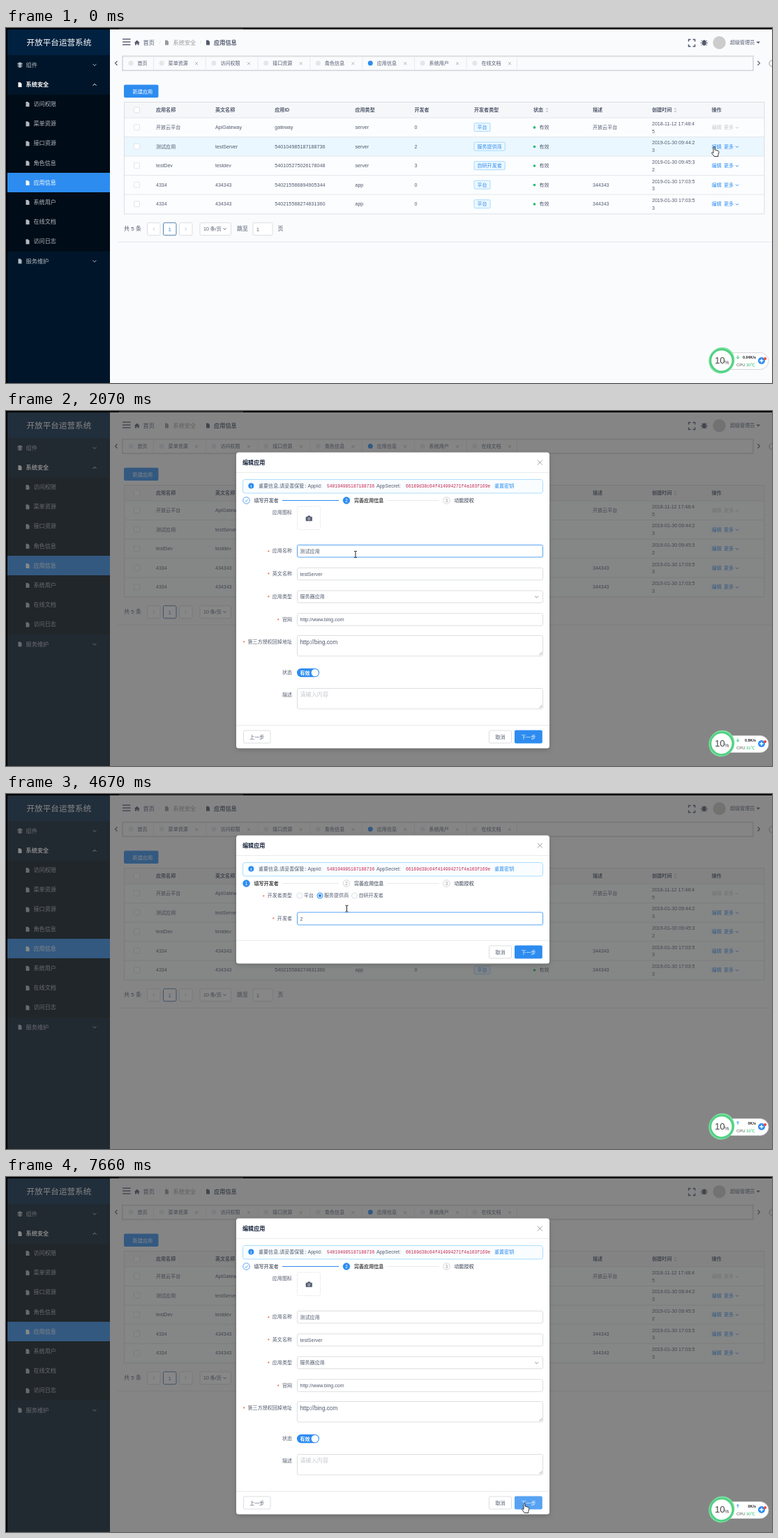
An HTML page for the animation above (8 s loop, 1098x510 px).

```html
<!DOCTYPE html>
<html lang="zh">
<head>
<meta charset="utf-8">
<style>
html, body { margin: 0; height: 100%; overflow: hidden; background: #000; }
svg { display: block; width: 100vw; height: 100vh; }
text { font-family: "Liberation Sans", "Noto Sans CJK SC", "Noto Sans CJK", sans-serif; white-space: pre; }
.mono { font-family: "Liberation Mono", monospace; }
</style>
</head>
<body>
<svg id="stage" viewBox="0 0 1098 510"></svg>
<script>
const BLUE = '#2d8cf0', INK = '#515a6e', GREY = '#c5c8ce', LINE = '#dcdee2';

// Drawing helpers; text is placed by its vertical middle.
const text = (x, y, s, size = 7.05, fill = INK, extra = '') =>
  `<text x="${x}" y="${y + size * .37}" font-size="${size}" fill="${fill}" ${extra}>${s}</text>`;
const rect = (x, y, w, h, fill, stroke = 'none', r = 0, extra = '') =>
  `<rect x="${x}" y="${y}" width="${w}" height="${h}" fill="${fill}" stroke="${stroke}" rx="${r}" ${extra}/>`;
const circle = (x, y, r, fill, stroke = 'none', extra = '') =>
  `<circle cx="${x}" cy="${y}" r="${r}" fill="${fill}" stroke="${stroke}" ${extra}/>`;
const path = (d, stroke, width = 1, fill = 'none', extra = '') =>
  `<path d="${d}" fill="${fill}" stroke="${stroke}" stroke-width="${width}" ${extra}/>`;
const hline = (x, y, w, color, width = 1) => path(`M${x} ${y}h${w}`, color, width);
const chevron = (x, y, color, s = 2, flip = 1) =>
  path(`M${x - s} ${y - s * flip / 2}l${s} ${s * flip}l${s} ${-s * flip}`, color, 1);
const cross = (x, y, s, color) => path(`M${x - s} ${y - s}l${2 * s} ${2 * s}m0 ${-2 * s}l${-2 * s} ${2 * s}`, color, .8);
const doc = (x, y, color) => path(`M${x - 2.5} ${y - 3.5}h3l2 2v5h-5z`, 'none', 0, color);
const bold = 'font-weight="bold"', mid = 'text-anchor="middle"', end = 'text-anchor="end"';

function sidebar() {
  const soft = '#b3b9c0', items = ['访问权限', '菜单资源', '接口资源', '角色信息', '应用信息', '系统用户', '在线文档', '访问日志'];
  let s = rect(2, 2, 147, 508, '#001529') + rect(2, 2, 147, 37, '#002140') + rect(2, 96, 147, 225, '#000c17')
    + text(29.5, 20.5, '开放平台运营系统', 11.6, '#fff')
    + path('M20 49.5l3.5 1.7-3.5 1.7-3.5-1.7zM16.5 53l3.5 1.7 3.5-1.7M16.5 55l3.5 1.7 3.5-1.7', soft, .8, soft)
    + text(28.5, 53, '组件', 8.2, soft) + chevron(127, 53, soft, 2.5)
    + doc(20, 81.5, '#fff') + text(28.5, 81, '系统安全', 8.2, '#fff', bold) + chevron(127, 81.5, '#fff', 2.5, -1)
    + doc(20, 335, soft) + text(28.5, 334.5, '服务维护', 8.2, soft) + chevron(127, 335, soft, 2.5);
  items.forEach((name, i) => {
    const y = 109.3 + i * 28.2, on = i === 4;
    if (on) s += rect(2, Math.round(y - 14), 147, 28, BLUE);
    s += doc(31, y + .3, on ? '#fff' : soft) + text(39.5, y - .3, name, 8.1, on ? '#fff' : soft);
  });
  return s;
}

function header() {
  const tabs = ['首页', '菜单资源', '访问权限', '接口资源', '角色信息', '应用信息', '系统用户', '在线文档'];
  let s = [16, 20, 24].map(y => hline(167, y, 11.5, INK, 1.4)).join('')
    + path('M183.8 21.3l4-3.8 4 3.8h-1.2v3.2h-2v-2h-1.6v2h-2v-3.2z', 'none', 0, INK)
    + text(196.5, 20.5, '首页', 8.2) + text(219.5, 20.5, '/', 8, LINE)
    + doc(230.5, 21, '#999') + text(239.5, 20.5, '系统安全', 8.2, '#999') + text(278, 20.5, '/', 8, LINE)
    + doc(289.5, 21, INK) + text(298, 20.5, '应用信息', 8.2, INK, bold)
    + path('M978.5 19.5v-3h3m3 0h3v3m0 4v3h-3m-3 0h-3v-3', INK, 1.5)
    + path('M996.5 18l8.5 7m-8.5 0l8.5-7m-9.5 3.5h10.5', INK, 1) + `<ellipse cx="1000.8" cy="21.3" rx="2.7" ry="4" fill="${INK}"/>`
    + circle(1022.5, 21, 9.2, '#ccc') + text(1038, 20.5, '超级管理员') + path('M1075.5 19.5h5.5l-2.75 3z', 'none', 0, INK)
    + rect(167, 40.5, 904, 20.5, '#fafbfd', '#dcdde0', 0, 'stroke-width="2"')
    + path('M159.5 47.5l-3 3 3 3M1077.5 47.5l3 3-3 3', INK, 1.2) + circle(1098.5, 51, 4.5, 'none', '#999');
  tabs.forEach((name, i) => {
    const dot = i ? 148.3 + i * 74.8 : 179, on = i === 5;
    s += circle(dot, 50.5, 3.5, on ? BLUE : '#e4e6e9') + text(dot + 9.5, 50.5, name)
      + path(`M${i < 7 ? 211.5 + i * 74.8 : 732.5} 42v17.5`, '#e8eaec');
    if (i) s += cross(dot + 50, 51, 2, '#aaa');
  });
  return s;
}

function table() {
  const heads = ['应用名称', '英文名称', '应用ID', '应用类型', '开发者', '开发者类型', '状态', '描述', '创建时间', '操作'];
  const cols = [215, 300, 385.3, 500.5, 585.5, 671, 756, 841, 926, 1011.5];
  const rows = [
    ['开放云平台', 'ApiGateway', 'gateway', 'server', '0', '平台', '开放云平台', '2018-11-12 17:48:45'],
    ['测试应用', 'testServer', '540104985187188736', 'server', '2', '服务提供商', '', '2019-01-30 09:44:23'],
    ['testDev', 'testdev', '540105275026178048', 'server', '3', '自研开发者', '', '2019-01-30 09:45:32'],
    ['4334', '434343', '540215586894905344', 'app', '0', '平台', '344343', '2019-01-30 17:03:53'],
    ['4334', '434343', '540215588274831360', 'app', '0', '平台', '344343', '2019-01-30 17:03:53']];
  const box = y => rect(183.5, y - 4, 8, 8, '#fff', LINE, 1, 'stroke-width=".8"');
  const sorter = x => path(`M${x - 2} 117l2-2.5 2 2.5zm0 2l2 2.5 2-2.5z`, 'none', 0, GREY);
  let s = rect(169, 81.5, 49.5, 18.5, BLUE, 'none', 2) + text(181.5, 91, '新建应用', 7.2, '#fff')
    + rect(169.5, 106.5, 917.5, 160.5, '#fcfdfe') + rect(169.5, 106.5, 917.5, 22.5, '#f6f7f9')
    + `<g id="hover">${rect(169.5, 156.5, 917.5, 27.5, '#ebf7ff')}</g>` + box(117.8) + sorter(775.5) + sorter(959.5);
  heads.forEach((h, i) => s += text(cols[i], 117.5, h, 7.05, INK, bold));
  rows.forEach((r, i) => {
    const y = 142.6 + i * 27.55, tagWidth = r[5].length * 7.05 + 9, link = i ? BLUE : GREY;
    s += hline(169.5, y - 13.6, 917.5, '#e4e6ea') + box(y);
    r.slice(0, 5).forEach((v, k) => s += text(cols[k], y, v, v.length > 15 ? 7.22 : 7.05));
    s += rect(671, y - 6, tagWidth, 12, '#edf7ff', '#91d5ff', 1.5, 'stroke-width=".8"') + text(675.5, y, r[5], 7.05, BLUE)
      + circle(757.5, y + .3, 1.8, '#19be6b') + text(764.5, y, '有效') + text(841, y, r[6])
      + text(926, y - 5.3, r[7].slice(0, -1)) + text(926, y + 5.3, r[7].slice(-1))
      + text(1011.5, y, '编辑', 7.05, link) + text(1029, y, '更多', 7.05, link) + chevron(1048, y + .5, link);
  });
  s += rect(169.5, 106.5, 917.5, 160.5, 'none', LINE);
  const cell = (x, w, color = LINE) => rect(x, 279.8, w, 18, '#fff', color, 2);
  return s + text(169, 288.5, '共 5 条', 8) + cell(202.5, 18.5) + cell(225.5, 18.5, '#4d7fae') + cell(248.5, 18.5)
    + path('M213 286.5l-2 2.3 2 2.3M256.5 286.5l2 2.3-2 2.3', GREY) + text(234.7, 288.8, '1', 8, BLUE, mid)
    + cell(278, 44.5) + text(283, 288.5, '10 条/页') + chevron(313.5, 288.7, INK)
    + text(331, 288.5, '跳至', 8) + cell(354, 28) + text(359, 289, '1') + text(389.5, 288.5, '页', 8)
    + hline(160, 307.5, 937, '#e4e6ea');
}

const field = (id, y, h, value, size, color) =>
  rect(417.5, y, 352, h, '#fff', LINE, 2, id && `id="${id}"`) + text(421.5, h > 20 ? y + 9 : y + h / 2, value, size, color);
const grip = y => path(`M764.5 ${y}l4-4m-1.8 4l1.8-1.8`, '#888', .7);
const label = (y, s, required = true) => text(410, y, s, 7.05, INK, end)
  + (required ? text(406 - s.length * 7.05, y + 1, '*', 8, '#ed4014', end) : '');

function stepBar(active) {
  const names = ['填写开发者', '完善应用信息', '功能授权'], xs = [344.5, 488, 631.5];
  return names.map((name, i) => {
    const x = xs[i], n = i + 1, on = n === active, done = n < active;
    return circle(x, 128.5, 4.8, on ? BLUE : '#fff', on || done ? BLUE : GREY, 'stroke-width=".8"')
      + (done ? path(`M${x - 2} 128.7l1.5 1.5 2.7-3`, BLUE, .8) : text(x, 128.5, n, 6.5, on ? '#fff' : '#999', mid))
      + text(x + 11, 128.5, name, 7.05, on ? '#444' : '#6b7280', bold)
      + (i < 2 ? hline(i ? 546 : 396, 128.5, i ? 75 : 81, done ? BLUE : '#e8eaec') : '');
  }).join('');
}

function dialog(step, bottom, form) {
  const button = (x, w, s) => rect(x, bottom - 25.5, w, 18, '#fff', LINE, 2) + text(x + w / 2, bottom - 16.5, s, 7.05, INK, mid);
  return `<g id="step${step}">` + rect(330, 59.5, 449, bottom - 59.5, '#fff', 'none', 3.5, 'filter="url(#shadow)"')
    + text(339, 73.7, '编辑应用', 8.1, '#17233d', bold) + cross(765.3, 74, 3.5, '#888') + hline(330, 88.5, 449, '#e8eaec')
    + rect(339.5, 98.5, 430, 19.5, '#f9fdff', '#abdcff', 3) + circle(351.3, 107.5, 4, BLUE)
    + text(351.3, 107.5, 'i', 6, '#fff', `${mid} ${bold}`)
    + text(362, 107.7, '重要信息,请妥善保管：') + text(432.5, 107.7, 'AppId:')
    + text(460, 108, '540104985187188736', 6.32, '#c7254e', 'class="mono"') + text(531, 107.7, 'AppSecret:')
    + text(573, 108, '66189d38c04f414994271f4a103f169e', 6.32, '#c7254e', 'class="mono"')
    + text(700, 107.7, '重置密钥', 7.05, BLUE) + stepBar(step) + form + hline(330, bottom - 33, 449, '#e8eaec')
    + (step > 1 ? button(340.5, 38.5, '上一步') : '') + button(692.5, 32, '取消')
    + rect(729, bottom - 26, 39.8, 19, BLUE, 'none', 2, `id="next${step}"`)
    + text(749, bottom - 16.5, '下一步', 7.05, '#fff', mid) + '</g>';
}

const developerForm = label(145.7, '开发者类型')
  + [[421, '平台'], [450, '服务提供商'], [499.5, '自研开发者']].map(([x, s], i) =>
    circle(x, 146, 4, '#fff', i === 1 ? BLUE : LINE) + (i === 1 ? circle(x, 146, 2.3, BLUE) : '') + text(x + 6, 145.7, s)).join('')
  + label(178, '开发者') + field('developer', 170, 18, '2');

const appForm = label(145.3, '应用图标', false)
  + rect(417.5, 137, 33, 33.5, '#fff', LINE, 2, 'stroke-dasharray="2 1.5" stroke-width=".8"')
  + path('M430 152.2h2l1-1.5h2.6l1 1.5h2v5.6H430z', INK, .6, INK) + circle(434.3, 154.8, 1.5, INK, '#fff', 'stroke-width=".7"')
  + label(200.8, '应用名称') + field('name', 192.5, 17.5, '测试应用')
  + label(233.5, '英文名称') + field('', 225.3, 17.5, 'testServer')
  + label(266.3, '应用类型') + field('', 258, 17.5, '服务器应用') + chevron(760.5, 267, '#808695', 2.3)
  + label(299, '官网') + field('', 290.8, 17.5, 'http://www.bing.com')
  + label(331.5, '第三方授权回掉地址') + field('', 322.5, 29.5, 'http://bing.com', 8.2) + grip(350.5)
  + label(375.5, '状态', false) + rect(417, 369.8, 32, 12.4, BLUE, 'none', 6.2) + text(421.5, 376, '有效', 7.05, '#fff', bold)
  + circle(442.8, 376, 5.2, '#fff')
  + label(407.3, '描述', false) + field('desc', 398.5, 29.5, '请输入内容', 8.1, GREY) + grip(426.5);

const monitor = rect(1020, 466.5, 73, 24, '#fff', '#d5d7da', 12)
  + '<ellipse cx="1025.8" cy="477.6" rx="18.2" ry="19.2" fill="#7fe0a3" transform="rotate(35 1025.8 477.6)"/>'
  + circle(1025.8, 477.8, 16, '#fff', '#4fd182', 'stroke-width="2.8"')
  + text(1016, 477.5, '10', 13, '#444') + text(1030, 480, '%', 7, '#444')
  + path('M1049 470.5v4.5', '', .9, 'none', 'id="arrowStem"') + path('', '', .9, 'none', 'id="arrowHead"')
  + text(1075, 473, '', 5.4, '#222', `id="speed" ${end} ${bold}`)
  + text(1047, 483.7, 'CPU', 6, '#555') + text(1061, 483.7, '', 6, '#19be6b', 'id="heat"')
  + circle(1083, 478, 5, BLUE) + path('M1080.3 478h5.4m-2.7-2.7v5.4', '#fff', 1.4) + circle(1088.2, 475, 2, '#f04a3c');

const pointers = '<g id="pointer">'
  + path('M0 0v10l2.4-2.1 1.7 3.7 1.6-.7-1.7-3.6h3.2z', '#222', .8, '#fff', 'id="arrow"')
  + path('M-1 0q1-1.2 2 0v4l5 1.5q1 .6.8 2l-1 4v2h-5.5l-4-5q.5-1.8 2.7 0z', '#222', .9, '#fff', 'id="hand"')
  + path('M-2-4.5h1.5L0-4l.5-.5H2M0-4v8m-2 .5h1.5L0 4l.5.5H2', '#222', 1, 'none', 'id="beam"')
  + path('M0-2v4', '#6b4a2c', 1.2, 'none', 'id="mark"') + '</g>';

const stage = document.getElementById('stage');
stage.innerHTML = `<filter id="shadow" x="-5%" y="-5%" width="110%" height="115%"><feDropShadow dx="0" dy="2" stdDeviation="3" flood-opacity=".2"/></filter>`
  + rect(0, 0, 1098, 510, '#000') + rect(162, 0, 178, 2, '#2a2a2a') + rect(149, 2, 949, 508, '#fafbfd')
  + sidebar() + header() + table() + rect(2, 2, 1096, 508, '#373737', 'none', 0, 'id="mask"')
  + `<g id="dialog">${dialog(1, 243.5, developerForm)}${dialog(2, 484.5, appForm)}</g>` + monitor + pointers;
const $ = id => document.getElementById(id);
const show = (id, on) => $(id).style.display = on ? '' : 'none';

const ticks = [[0, 0, 1], [250, 1260, 8], [1390, 2070, 5], [2380, 3350, 8], [3500, 4430, 8], [4550, 5490, 8], [5610, 6570, 8], [6720, 7230, 5], [7660, 7660, 1]]
  .flatMap(([a, b, n]) => Array.from({ length: n }, (_, i) => Math.floor((a + (b - a) * i / Math.max(1, n - 1)) / 10) * 10));

// Pointer path: time, x, y, shape.
const route = [
  [0, 1015, 171, 'hand'], [250, 1015, 171, 'hand'], [390, 1004, 176, 'arrow'], [530, 986, 179, 'arrow'],
  [1260, 600, 216, 'beam'], [1560, 515, 203, 'beam'], [2070, 501, 206, 'beam'], [2380, 480, 235, 'arrow'],
  [2790, 362, 463, 'hand'], [3070, 362, 463, 'arrow'], [3500, 480, 190, 'beam'], [3650, 494, 182, 'beam'],
  [4430, 510, 180, 'beam'], [4820, 440, 130, 'arrow'], [5220, 690, 110, 'arrow'], [5490, 757, 224, 'hand'],
  [5610, 765, 231, 'mark'], [5740, 750, 260, 'arrow'], [6020, 620, 412, 'beam'], [6300, 630, 415, 'beam'],
  [6430, 690, 443, 'arrow'], [6570, 715, 453, 'arrow'], [6840, 736, 464, 'hand'], [7230, 743, 469, 'hand'], [8000, 743, 469, 'hand']];

// Time, download (1) or upload (0), speed, temperature.
const readings = [[0, 1, '0.04', 30], [1110, 1, '0.9', 31], [2930, 0, '0', 31], [4550, 0, '0', 33], [6150, 0, '0', 35], [7230, 0, '0', 30]];
const between = (t, a, b) => t >= a && t < b;

function render(now) {
  const t = ticks.findLast(k => k <= now % 8000);
  const open = Math.min(1, Math.max(0, (t - 285) / 300));
  show('hover', t < 390);
  $('mask').setAttribute('opacity', .6 * open ** 3);
  $('dialog').setAttribute('opacity', open);
  $('dialog').setAttribute('transform', `translate(554.5 272) scale(${.9 + .1 * open}) translate(-554.5 -272)`);
  const first = between(t, 3070, 5740);
  show('step1', first);
  show('step2', !first);

  const focus = (id, a, b) => $(id).setAttribute('stroke', between(t, a, b) ? '#57a3f3' : LINE);
  focus('name', 1560, 2790);
  focus('developer', 3630, 5610);
  focus('desc', 6150, 6570);
  if (t === 6570) $('desc').setAttribute('stroke', '#a9cdf3');
  $('next1').setAttribute('fill', between(t, 5490, 5740) ? '#4498f1' : BLUE);
  $('next2').setAttribute('fill', t >= 6840 ? '#57a3f3' : BLUE);

  const i = route.findLastIndex(k => k[0] <= t), [a, x, y, shape] = route[i], [b, x2, y2] = route[i + 1];
  const p = (t - a) / (b - a);
  $('pointer').setAttribute('transform', `translate(${x + (x2 - x) * p} ${y + (y2 - y) * p})`);
  for (const id of ['arrow', 'hand', 'beam', 'mark']) show(id, id === shape);

  const [, down, speed, heat] = readings.findLast(k => k[0] <= t), tint = down ? '#19be6b' : BLUE;
  $('arrowStem').setAttribute('stroke', tint);
  $('arrowHead').setAttribute('stroke', tint);
  $('arrowHead').setAttribute('d', down ? 'M1047.2 473.2l1.8 1.8 1.8-1.8' : 'M1047.2 472.3l1.8-1.8 1.8 1.8');
  $('speed').textContent = speed + 'K/s';
  $('heat').textContent = heat + '℃';
  requestAnimationFrame(render);
}
requestAnimationFrame(render);
</script>
</body>
</html>
```
